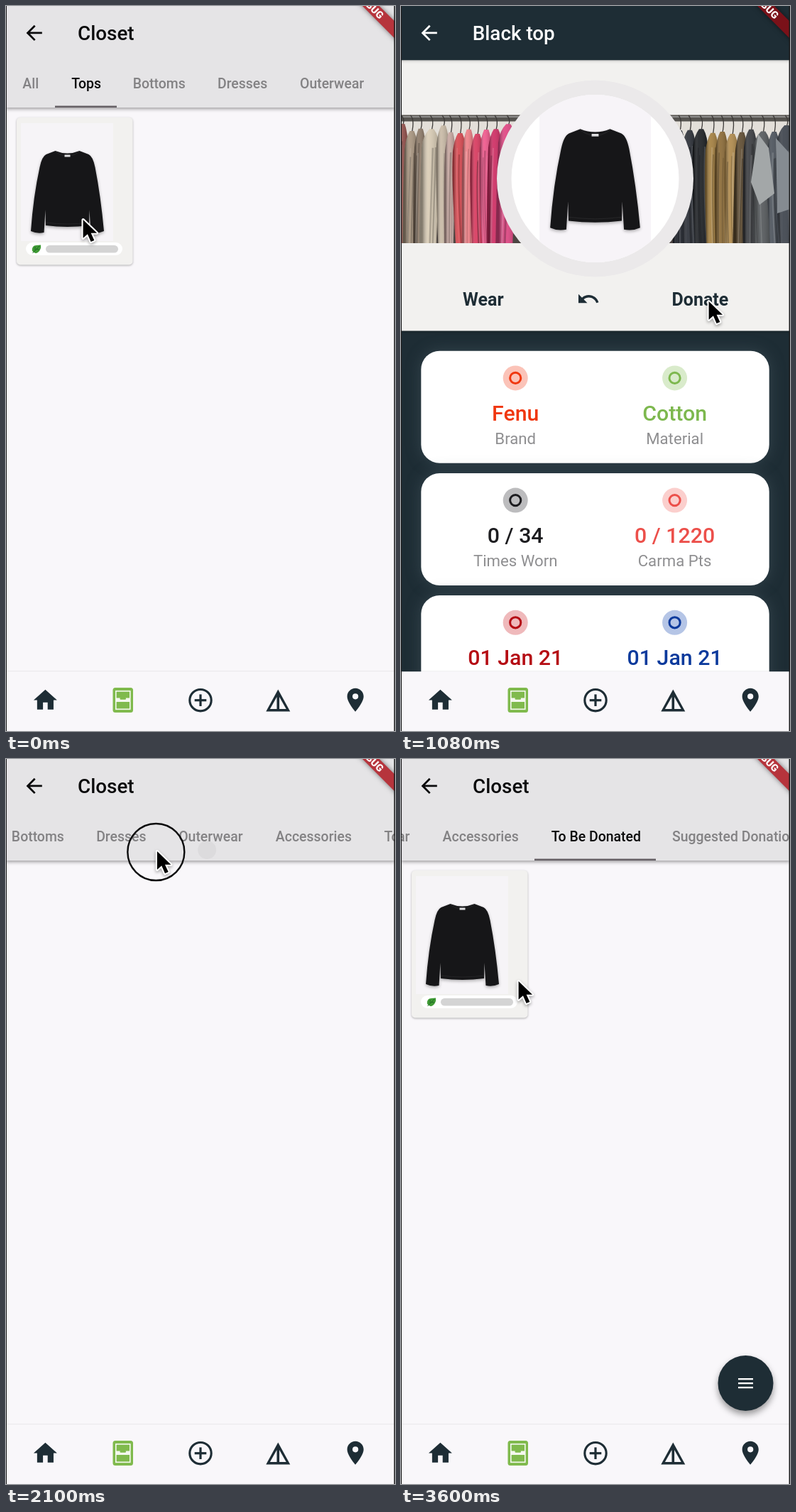
These frames come from a looping animation (548 by 1021 pixels, 3660 ms). An HTML page with a canvas:

```html
<!DOCTYPE html>
<html lang="en">
<head>
<meta charset="utf-8">
<title>Closet</title>
<style>
html, body { margin: 0; width: 100%; height: 100%; overflow: hidden; background: #f9f7fa; }
canvas { display: block; width: 548px; height: 1021px; }
</style>
</head>
<body>
<canvas id="stage"></canvas>
<script>
const W = 548, H = 1021, LOOP = 3660, STEP = 60;
const NAVY = '#1e2d35', PAPER = '#f9f7fa', LINEN = '#f2f1ef';
const canvas = document.getElementById('stage');
const dpr = window.devicePixelRatio || 1;
canvas.width = W * dpr;
canvas.height = H * dpr;
const c = canvas.getContext('2d');

const clamp = v => Math.max(0, Math.min(1, v));
const smooth = v => v * v * (3 - 2 * v);
const easeOut = v => 1 - (1 - v) ** 3;
const span = (t, a, b) => clamp((t - a) / (b - a));
const mix = (a, b, k) => a + (b - a) * k;

function layer(draw) { c.save(); draw(); c.restore(); }

function box(x, y, w, h, fill, r = 0) {
  c.fillStyle = fill;
  c.beginPath();
  c.roundRect(x, y, w, h, r);
  c.fill();
}

function disc(x, y, r, fill) {
  c.fillStyle = fill;
  c.beginPath();
  c.arc(x, y, r, 0, 7);
  c.fill();
}

function ring(x, y, r, width, color) {
  c.strokeStyle = color;
  c.lineWidth = width;
  c.beginPath();
  c.arc(x, y, r, 0, 7);
  c.stroke();
}

function shadow(color, blur, dy = 0) {
  c.shadowColor = color;
  c.shadowBlur = blur * dpr;
  c.shadowOffsetY = dy * dpr;
}

function text(str, x, y, size, weight, color, align = 'left') {
  c.font = `${weight} ${size}px Roboto, sans-serif`;
  c.textAlign = align;
  c.fillStyle = color;
  c.fillText(str, x, y);
}

function icon(path, x, y, scale, color) {
  layer(() => {
    c.translate(x, y);
    c.scale(scale, scale);
    c.fillStyle = color;
    c.fill(path, 'evenodd');
  });
}

const ARROW = new Path2D('M20 11H7.83l5.59-5.59L12 4l-8 8 8 8 1.41-1.41L7.83 13H20z');
const UNDO = new Path2D('M12.5 8c-2.65 0-5.05.99-6.9 2.6L2 7v9h9l-3.62-3.62c1.39-1.16 3.16-1.88 5.12-1.88 3.54 0 6.55 2.31 7.6 5.5l2.37-.78C21.08 11.03 17.15 8 12.5 8z');
const HOME = new Path2D('M10 20v-6h4v6h5v-8h3L12 3 2 12h3v8z');
const PIN = new Path2D('M12 2C8.13 2 5 5.13 5 9c0 5.25 7 13 7 13s7-7.75 7-13c0-3.87-3.13-7-7-7zm0 9.5a2.5 2.5 0 0 1 0-5 2.5 2.5 0 0 1 0 5z');
const TENT = new Path2D('M17 0L34 31H0zM15.2 10.5V27.5H5.6zM18.8 10.5V27.5H28.4z');
const SWEATER = new Path2D('M-17 1Q0 8 17 1L30 6Q36 9 39 24Q47 65 51.5 114Q43 118 33 116L31 84L30.500 106Q0 110-30.500 106L-31 84L-33 116Q-43 118-51.500 114Q-48 65-39 24Q-36 9-30 6z');
const POINTER = new Path2D('M2 3V28L8 22.5L12.5 33L17 31L12.5 21H20.5z');

function sweater(x, y, scale) {
  layer(() => {
    c.translate(x, y);
    c.scale(scale, scale);
    shadow('rgba(0,0,0,.3)', 4, 2);
    c.fillStyle = '#161618';
    c.fill(SWEATER);
    shadow('transparent', 0);
    c.strokeStyle = '#242426';
    c.lineWidth = 1;
    c.stroke(new Path2D('M-17 2Q0 15 17 2M-30 102Q0 106 30 102'));
    box(-4, 6.5, 8, 3, '#dedee0');
  });
}

// Clothes rail: [left, width, colour] per garment.
const RAIL = [
  [-6, 15, '#96524d'], [6, 17, '#a8957f'], [20, 14, '#8d7a68'], [30, 24, '#d9ccb5'],
  [51, 16, '#c9baa6'], [63, 13, '#c7a7a0'], [74, 17, '#d8474f'], [88, 14, '#ef7f86'],
  [99, 16, '#d9395e'], [112, 15, '#f0588c'], [124, 18, '#cf2d63'], [138, 24, '#e04582'],
  [384, 16, '#20242c'], [397, 18, '#2b2f37'], [412, 20, '#1d2024'], [430, 17, '#a47f3f'],
  [444, 16, '#8b6a36'], [457, 18, '#b08a4c'], [472, 15, '#5f4c31'], [484, 17, '#3a3c40'],
  [497, 24, '#565a5d'], [517, 16, '#4b525b'], [530, 24, '#3d434c']
];

function garment(x, w, color, top, lean) {
  const mid = x + w * .55;
  c.strokeStyle = '#3d3a38';
  c.lineWidth = 1.3;
  c.stroke(new Path2D(`M${mid - 2} 154Q${mid + 4} 160 ${mid} ${top + 2}`));
  const shape = new Path2D(`M${x + lean} 334Q${x - 3} ${top + 70} ${x - 1} ${top + 26}
    Q${x + 1} ${top + 9} ${mid - 3} ${top}H${mid + 3}
    Q${x + w} ${top + 10} ${x + w + 1} ${top + 32}L${x + w + lean} 334z`);
  c.fillStyle = color;
  c.fill(shape);
  const shade = c.createLinearGradient(x, 0, x + w, 0);
  shade.addColorStop(0, 'rgba(0,0,0,.4)');
  shade.addColorStop(.35, 'rgba(255,255,255,.08)');
  shade.addColorStop(1, 'rgba(0,0,0,.22)');
  c.fillStyle = shade;
  c.fill(shape);
}

function rail() {
  let seed = 11;
  const rnd = () => (seed = seed * 16807 % 2147483647) / 2147483647;
  layer(() => {
    c.beginPath();
    c.rect(0, 153, W, 181);
    c.clip();
    box(0, 153, W, 181, '#e3dfd9');
    box(0, 195, W, 139, '#4c4542');
    box(0, 153.5, W, 9, '#55534f');
    box(0, 155, W, 2, '#8f8e8c');
    for (const [x, w, color] of RAIL) {
      const top = 166 + rnd() * 14, lean = rnd() * 8 - 5;
      garment(x, w, color, top, lean);
      for (let i = 0; i < 3; i++) {
        const fx = x + 2 + rnd() * (w - 3);
        c.strokeStyle = i % 2 ? 'rgba(255,255,255,.14)' : 'rgba(0,0,0,.2)';
        c.lineWidth = 1 + rnd() * 1.6;
        c.stroke(new Path2D(`M${fx} ${top + 20 + rnd() * 20}Q${fx - 2} 260 ${fx + lean} 334`));
      }
    }
    c.fillStyle = '#a3a7a8';
    c.fill(new Path2D('M503 180L518 200L526 264L505 280L493 248z'));
    c.fillStyle = '#858b91';
    c.fill(new Path2D('M528 186L548 208V286L530 292z'));
  });
}

function itemCard(dx) {
  layer(() => {
    c.translate(dx, 0);
    layer(() => {
      shadow('rgba(0,0,0,.3)', 3, 1);
      box(15, 157, 163.5, 207.5, LINEN, 5);
    });
    box(21, 165, 130, 166, '#f6f4f7');
    sweater(86.5, 203, 1);
    box(28, 333, 136, 18, '#fff', 9);
    box(56, 337, 102, 10.5, '#d4d4d4', 5.2);
    c.fillStyle = '#3f9a35';
    c.fill(new Path2D('M37 345Q36 337 43 337L49 336.500Q50 343 45 347Q41 350 37 345z'));
    c.strokeStyle = '#1f6a22';
    c.lineWidth = 1;
    c.stroke(new Path2D('M37.500 348L47 338M41 344L41 339M43 342.500L47 343'));
  });
}

const TABS = [
  ['All', 23.3], ['Tops', 92.2], ['Bottoms', 178.7], ['Dresses', 298], ['Outerwear', 414],
  ['Accessories', 550.6], ['To Be Donated', 703.7], ['Suggested Donations', 874]
];

function scrollAt(t) {
  if (t < 2160) return 205 * span(t, 1800, 2160);
  if (t < 3120) return mix(205, 314, easeOut(span(t, 2160, 2640)));
  return mix(314, 492, smooth(span(t, 3120, 3420)));
}

function closet(t) {
  const slide = smooth(span(t, 3120, 3420));
  const scroll = scrollAt(t);
  box(0, 0, W, H, PAPER);
  if (t < 600) itemCard(0);
  else if (slide > 0) itemCard(W * (1 - slide));

  layer(() => {
    shadow('rgba(0,0,0,.38)', 5, 2);
    box(0, -10, W, 153, '#e5e4e6');
  });
  icon(ARROW, 23, 21.3, 1.39, '#0b0b0c');
  text('Closet', 101, 48.3, 27.8, 500, '#0b0b0c');

  layer(() => {
    c.beginPath();
    c.rect(0, 80, W, 63);
    c.clip();
    c.translate(-scroll, 0);
    if (t > 1800 && t < 2220) disc(454, 128, 13 * span(t, 1740, 1980), 'rgba(0,0,0,.035)');
    const active = slide > .5 ? 6 : 1;
    TABS.forEach(([name, x], i) =>
      text(name, x, 115.8, 19.45, 500, i === active ? '#0b0b0c' : '#838284'));
    box(mix(69, 680, slide), 140.5, mix(87, 171, slide), 2.5, '#666166');
  });

  const pop = easeOut(span(t, 3360, 3540));
  if (pop > 0) layer(() => {
    c.translate(485.5, 879);
    c.scale(pop, pop);
    layer(() => {
      shadow('rgba(0,0,0,.4)', 10, 5);
      disc(0, 0, 39, NAVY);
    });
    for (const y of [-7, -1, 5]) box(-10.5, y, 21, 2.3, '#fff');
  });
}

const STATS = [
  [485.7, ['Fenu', 'Brand', '#f0370f', '#fbc3b8'], ['Cotton', 'Material', '#7db84e', '#d9ebcb']],
  [657.9, ['0 / 34', 'Times Worn', '#1d1d20', '#bcbcbe'], ['0 / 1220', 'Carma Pts', '#ec4f4a', '#fbcfcd']],
  [830.1, ['01 Jan 21', 'Purchased', '#b50d14', '#efb9bb'], ['01 Jan 21', 'Last Worn', '#0c3a9c', '#b5c5e6']]
];

function detail() {
  box(0, 0, W, H, NAVY);
  layer(() => {
    shadow('rgba(0,0,0,.3)', 4, 1);
    box(0, 76, W, 381.5, LINEN);
  });
  rail();
  disc(273.5, 243, 138.5, '#ebe9ea');
  disc(273.5, 243, 118, '#fff');
  layer(() => {
    c.beginPath();
    c.arc(273.5, 243, 118, 0, 7);
    c.clip();
    box(195, 120, 157, 250, '#f7f4f8');
  });
  sweater(273.5, 172, 1.23);
  text('Wear', 87, 421.5, 25, 700, NAVY);
  text('Donate', 381.5, 421.5, 25, 700, NAVY);
  icon(UNDO, 247.2, 396, 1.39, NAVY);

  for (const [y, ...cols] of STATS) {
    layer(() => {
      shadow('rgba(80,98,106,.45)', 22);
      box(28.3, y, 490.4, 158, '#fff', 26);
    });
    cols.forEach(([value, label, color, tint], i) => {
      const x = i ? 385.6 : 161.2;
      disc(x, y + 38.2, 17.5, tint);
      ring(x, y + 38.2, 7.6, 3, color);
      text(value, x, y + 97.8, 30.3, 500, color, 'center');
      text(label, x, y + 131.3, 22.2, 400, '#8f8f91', 'center');
    });
  }

  layer(() => {
    shadow('rgba(0,0,0,.25)', 4, 1);
    box(0, -10, W, 86.3, NAVY);
  });
  icon(ARROW, 23, 21.3, 1.39, '#fff');
  text('Black top', 100.7, 48.3, 27.8, 500, '#fff');
}

function navBar() {
  box(0, 936, W, 2, 'rgba(0,0,0,.05)');
  box(0, 937.2, W, 84, PAPER);
  icon(HOME, 35.6, 957.7, 1.65, NAVY);
  box(150.5, 960, 28.5, 35, '#80ba4d', 3.5);
  c.strokeStyle = '#f4f8ee';
  c.lineWidth = 1.6;
  c.strokeRect(154.8, 964.8, 20, 25.5);
  box(155, 974.5, 19.5, 5.5, '#f4f8ee');
  box(160.5, 974, 8.5, 2.8, '#80ba4d', 1.3);
  ring(274, 977.7, 15.2, 3.1, NAVY);
  box(265.7, 976.1, 16.6, 3.2, NAVY);
  box(272.4, 969.4, 3.2, 16.6, NAVY);
  icon(TENT, 366.3, 962.5, 1, NAVY);
  icon(PIN, 472.4, 957.5, 1.65, NAVY);
}

function ribbon(dark) {
  layer(() => {
    c.translate(529.5, 15.5);
    c.rotate(Math.PI / 4);
    shadow('rgba(0,0,0,.5)', 7);
    box(-90, -8.4, 160, 16.8, `rgb(${mix(182, 122, dark)},${mix(52, 17, dark)},${mix(60, 25, dark)})`);
    shadow('transparent', 0);
    text('DEBUG', 0, 5, 14.2, 900, '#fff', 'right');
  });
}

// Pointer keys: [time, x, y]; moves ease unless the pointer is dragging.
const MOVES = [
  [0, 107, 298], [420, 107, 298], [960, 432, 413], [1260, 432, 413], [1620, 436, 115],
  [1800, 448, 127], [2160, 164, 127], [2460, 164, 127], [2940, 406, 115],
  [3240, 406, 115], [3600, 164, 310], [LOOP, 164, 310]
];
const PRESSES = [[60, 180], [1140, 1260], [1800, 2220], [3120, 3240]];

function pointer(t) {
  let i = 0;
  while (i < MOVES.length - 2 && t >= MOVES[i + 1][0]) i++;
  const [t0, x0, y0] = MOVES[i], [t1, x1, y1] = MOVES[i + 1];
  const k = span(t, t0, t1), e = t0 === 1800 ? k : smooth(k);
  const x = mix(x0, x1, e), y = mix(y0, y1, e);
  if (PRESSES.some(([a, b]) => t >= a && t < b)) ring(x, y + 4, 40, 2.4, '#0b0b0c');
  layer(() => {
    c.translate(x - .5, y);
    c.scale(1.05, 1.03);
    c.lineJoin = 'round';
    c.strokeStyle = '#fff';
    c.lineWidth = 4;
    shadow('rgba(0,0,0,.35)', 4, 2);
    c.stroke(POINTER);
    shadow('transparent', 0);
    c.fillStyle = '#000';
    c.fill(POINTER);
  });
}

function render(t) {
  c.setTransform(dpr, 0, 0, dpr, 0, 0);
  closet(t);
  const open = t < 1260 ? easeOut(span(t, 0, 240)) : 1 - smooth(span(t, 1260, 1500));
  if (open > 0) layer(() => {
    c.globalAlpha = open;
    c.translate(0, (1 - open) * 220);
    detail();
  });
  navBar();
  ribbon(open);
  box(0, 0, 1, H, '#1a1a1b');
  box(546.6, 0, 1.4, H, '#1a1a1b');
  pointer(t);
}

const start = performance.now();
function tick() {
  const t = (performance.now() - start) % LOOP;
  render(Math.floor(t / STEP) * STEP);
  requestAnimationFrame(tick);
}
tick();
</script>
</body>
</html>
```
